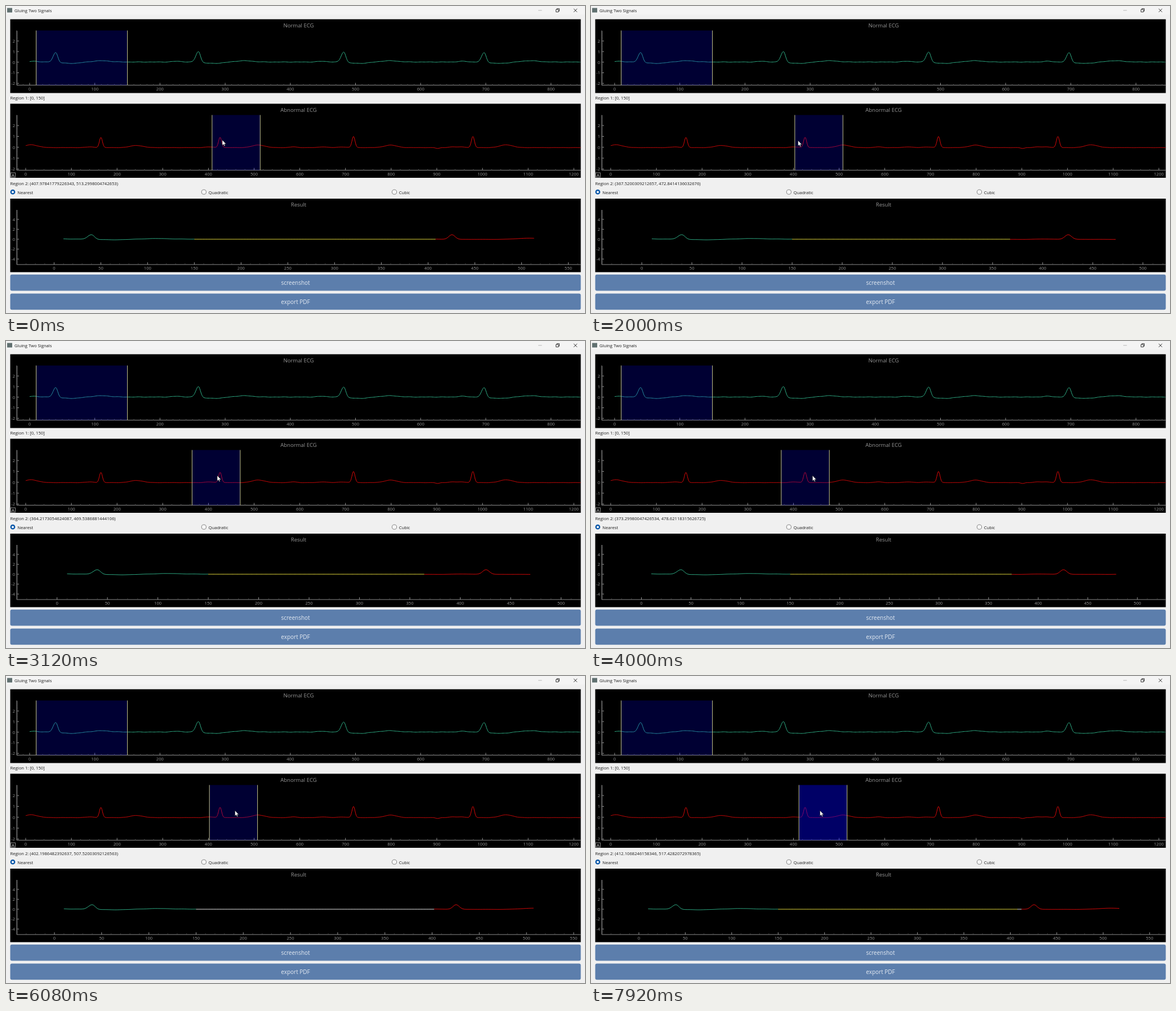
These frames come from a looping animation (1028x545 px, 8 s). An HTML page:

```html
<!DOCTYPE html>
<html lang="en">
<head>
<meta charset="utf-8">
<title>Gluing Two Signals</title>
<style>
  html, body { margin: 0; width: 100%; height: 100%; overflow: hidden; background: #f0f0f0; }
  svg { display: block; width: 100%; height: 100%; }
  text { font-family: "Open Sans", "Noto Sans", sans-serif; font-size: 7.65px; fill: #1c1c1c; }
  .tick { fill: #969696; }
  .title { font-size: 9.55px; fill: #969696; text-anchor: middle; }
  .button { font-size: 10px; fill: #e4eaf2; text-anchor: middle; }
  .curve { fill: none; stroke-width: 1; stroke-linejoin: round; }
</style>
</head>
<body>
<svg id="stage" viewBox="0 0 1028 545"></svg>
<script>
const LOOP = 8000;
const LEFT = 19, RIGHT = 1020.5;
const GREEN = '#2fae86', RED = '#dc0808', YELLOW = '#e6dc3c', WHITE = '#eeeeee';
const stage = document.getElementById('stage');

function add(parent, name, attrs = {}, content) {
  const node = document.createElementNS('http://www.w3.org/2000/svg', name);
  for (const key in attrs) node.setAttribute(key, attrs[key]);
  if (content !== undefined) node.textContent = content;
  parent.appendChild(node);
  return node;
}
function set(node, attrs) {
  for (const key in attrs) node.setAttribute(key, attrs[key]);
}
const label = (parent, x, y, content, attrs) => add(parent, 'text', { x, y, ...attrs }, content);

// Signals, in data units
const bump = (x, center, width, height) => height * Math.exp(-(((x - center) / width) ** 2));

const normalBeats = [[40, .93], [259, 1.03], [482, .99], [697.5, .91]];
function normalEcg(x) {
  let y = .015 + .018 * Math.sin(x * .31) * Math.sin(x * .083);
  for (const [c, h] of normalBeats) {
    y += bump(x, c, x < c ? 5.6 : 4.4, h)
       + bump(x, c + 23, 20, -.13)
       + bump(x, c + 70, 18, .12)
       + bump(x, c - 33, 10, .07);
  }
  return y;
}

const abnormalBeats = [[164.6, .93, 78, .2], [425.5, .95, 84, .24], [717.6, 1.02, 81, .23], [979, 1.02, 73, .26]];
function abnormalEcg(x) {
  let y = -.03 + .01 * Math.sin(x * .21) * Math.sin(x * .07)
    + bump(x, 12, 20, .26) + bump(x, 586, 10, .07) + bump(x, 651, 12, .07)
    + bump(x, 902, 6, -.08) + bump(x, 934, 12, .06);
  for (const [c, h, gap, t] of abnormalBeats) {
    y += bump(x, c, 4.7, h) + bump(x, c + gap, 19, t) + bump(x, c - 24, 13, .06);
  }
  return y;
}

function trace(plot, signal, from, to) {
  let d = '';
  for (let x = from; x < to; x += 1) d += point(x);
  return 'M' + (d + point(to)).slice(1);
  function point(x) {
    return `L${(plot.x0 + x * plot.sx).toFixed(2)} ${(plot.y0 - signal(x) * plot.sy).toFixed(2)}`;
  }
}

function drawXAxis(group, plot, major, minor) {
  group.replaceChildren();
  let small = '', big = '';
  for (let v = Math.ceil((LEFT - plot.x0) / plot.sx / minor) * minor; ; v += minor) {
    const x = plot.x0 + v * plot.sx;
    if (x > RIGHT) break;
    if (v % major) {
      small += `M${x.toFixed(1)} ${plot.axis}v-2`;
    } else {
      big += `M${x.toFixed(1)} ${plot.axis}v-4`;
      label(group, x, plot.axis + 9, v, { class: 'tick', 'text-anchor': 'middle' });
    }
  }
  add(group, 'path', { d: small, stroke: '#4a4a4a' });
  add(group, 'path', { d: big, stroke: '#969696' });
}

function drawPlot(plot, title) {
  const { top, bottom, axis, y0, sy, step } = plot;
  add(stage, 'rect', { x: 7.5, y: top, width: 1013, height: bottom - top });
  label(stage, 519.5, top + 14.3, title, { class: 'title' });
  let small = '', big = '';
  for (let i = -40; i <= 40; i++) {
    const y = y0 - i * sy * step / 10;
    if (y < top + 20 || y > axis) continue;
    if (i % 10) small += `M${LEFT} ${y.toFixed(1)}h2`;
    else {
      big += `M${LEFT} ${y.toFixed(1)}h4`;
      label(stage, 16, y + 2.8, i / 10 * step, { class: 'tick', 'text-anchor': 'end' });
    }
  }
  add(stage, 'path', { d: small, stroke: '#4a4a4a' });
  add(stage, 'path', { d: big, stroke: '#969696' });
  add(stage, 'path', { d: `M${LEFT} ${top + 20}V${axis}H${RIGHT}`, fill: 'none', stroke: '#8c8c8c' });
  plot.ticks = add(stage, 'g');
}

function addRegion(plot) {
  const y = plot.top + 20, height = plot.axis - y;
  const fill = add(stage, 'rect', { y, height, fill: '#0000ff' });
  const edges = add(stage, 'path', { stroke: '#c4c48c', 'stroke-width': 1 });
  return (from, to, opacity) => {
    const a = plot.x0 + from * plot.sx, b = plot.x0 + to * plot.sx;
    set(fill, { x: a, width: b - a, 'fill-opacity': opacity });
    set(edges, { d: `M${a} ${y}v${height}M${b} ${y}v${height}` });
  };
}

// Window frame
add(stage, 'rect', { width: 1028, height: 545, fill: '#f0f0f0' });
add(stage, 'rect', { width: 1028, height: 15.5, fill: '#f4f4f4' });
add(stage, 'rect', { x: 2, y: 3.5, width: 9, height: 8, fill: '#607070' });
label(stage, 15, 10.6, 'Gluing Two Signals');
add(stage, 'path', { d: 'M945 7.8h6.5', stroke: '#aaaaaa', 'stroke-width': .8 });
add(stage, 'path', {
  d: 'M976.5 6.2h4.4v4.4h-4.4zM978 6v-1.3h4.4v4.4h-1.3M1008 4.8l6 6M1014 4.8l-6 6',
  fill: 'none', stroke: '#222222', 'stroke-width': .9
});

const normal = { top: 23.5, bottom: 154.5, axis: 140.5, x0: 42, sx: 1.157, y0: 99.7, sy: 18.8, step: 1 };
const abnormal = { top: 173.5, bottom: 305, axis: 291.5, x0: 35, sx: .811, y0: 250.8, sy: 19.3, step: 1 };
const result = { top: 342, bottom: 472.5, axis: 459, x0: 85, sx: 1.66, y0: 414, sy: 8.8, step: 2 };

drawPlot(normal, 'Normal ECG');
drawXAxis(normal.ticks, normal, 100, 10);
add(stage, 'path', { class: 'curve', stroke: GREEN, d: trace(normal, normalEcg, 0, 845) });
addRegion(normal)(10, 150, .2);
label(stage, 7.5, 166.4, 'Region 1: [0, 150]');

drawPlot(abnormal, 'Abnormal ECG');
drawXAxis(abnormal.ticks, abnormal, 100, 20);
add(stage, 'path', { class: 'curve', stroke: RED, d: trace(abnormal, abnormalEcg, 0, 1215) });
const moveRegion = addRegion(abnormal);
add(stage, 'rect', { x: 8.5, y: 296, width: 8, height: 8, fill: '#000', stroke: '#b0b0b0', 'stroke-width': .8 });
label(stage, 12.5, 302.7, 'A', { 'text-anchor': 'middle', style: 'fill:#d0d0d0' });
const regionText = label(stage, 7.5, 317.8, '');

[[12, 'Nearest'], [351.3, 'Quadratic'], [689.5, 'Cubic']].forEach(([x, name], i) => {
  add(stage, 'circle', i
    ? { cx: x, cy: 330.2, r: 4.1, fill: '#f6f6f6', stroke: '#666666', 'stroke-width': .8 }
    : { cx: x, cy: 330.2, r: 3.2, fill: '#ffffff', stroke: '#0b57a8', 'stroke-width': 2.4 });
  label(stage, x + 8.2, 333.5, name);
});

drawPlot(result, 'Result');
const curve = stroke => add(stage, 'path', { class: 'curve', stroke });
const firstPart = curve(GREEN), lastPart = curve(RED), newGlue = curve(WHITE), glue = curve(YELLOW);

[[476.8, 'screenshot'], [510.5, 'export PDF']].forEach(([y, name]) => {
  add(stage, 'rect', { x: 7.5, y, width: 1013, height: 28.7, rx: 3, fill: '#5c7eac' });
  label(stage, 514, y + 18.3, name, { class: 'button' });
});

const cursor = add(stage, 'path', {
  d: 'M0 0V9.6L2.2 7.6L3.7 11L5.2 10.3L3.7 7.1H6.7Z',
  fill: '#ffffff', stroke: '#000000', 'stroke-width': .5
});

// The region trails behind the cursor in a few late redraws.
const WIDTH = 105.321382682;
const states = [
  { at: 0, from: '407.97841779226343', to: '513.2998004742653' },
  { at: 1840, from: '367.5200309212657', to: '472.8414136032676', shown: 403.02 },
  { at: 2560, from: '364.2173054624087', to: '469.5386881444106' },
  { at: 3920, from: '373.29980047426534', to: '478.62118315626725' },
  { at: 5600, from: '402.1986482392637', to: '507.52003092126563', glued: 150 },
  { at: 7040, from: '412.1068246158346', to: '517.4282072978365', glued: 407.6, opacity: .4 }
];
const cursorPath = [[0, 384, 237.8], [960, 370.3, 238.8], [2000, 367.6, 238.8], [3120, 375, 238.8],
  [4640, 406.5, 238.8], [LOOP, 406.5, 238.8]];

function show(state) {
  const from = +state.from, to = +state.to, shown = state.shown ?? from;
  moveRegion(shown, shown + WIDTH, state.opacity ?? .2);
  regionText.textContent = `Region 2: (${state.from}, ${state.to})`;
  result.sx = (RIGHT - LEFT) / (to + 90);
  result.x0 = LEFT + 40 * result.sx;
  drawXAxis(result.ticks, result, 50, 10);
  const flat = () => 0, glued = state.glued ?? from;
  set(firstPart, { d: trace(result, normalEcg, 10, 150) });
  set(lastPart, { d: trace(result, abnormalEcg, from, to) });
  set(newGlue, { d: trace(result, flat, glued, from) });
  set(glue, { d: trace(result, flat, 150, glued) });
}

let current;
function frame(now) {
  const t = now % LOOP;
  const state = states.findLast(s => s.at <= t);
  if (state !== current) show(current = state);
  const i = cursorPath.findIndex(p => p[0] > t);
  const [t0, xa, ya] = cursorPath[i - 1], [t1, xb, yb] = cursorPath[i];
  const f = (t - t0) / (t1 - t0);
  set(cursor, { transform: `translate(${xa + (xb - xa) * f} ${ya + (yb - ya) * f})` });
  requestAnimationFrame(frame);
}
const start = performance.now();
const tick = frame;
frame(0);
</script>
</body>
</html>
```
